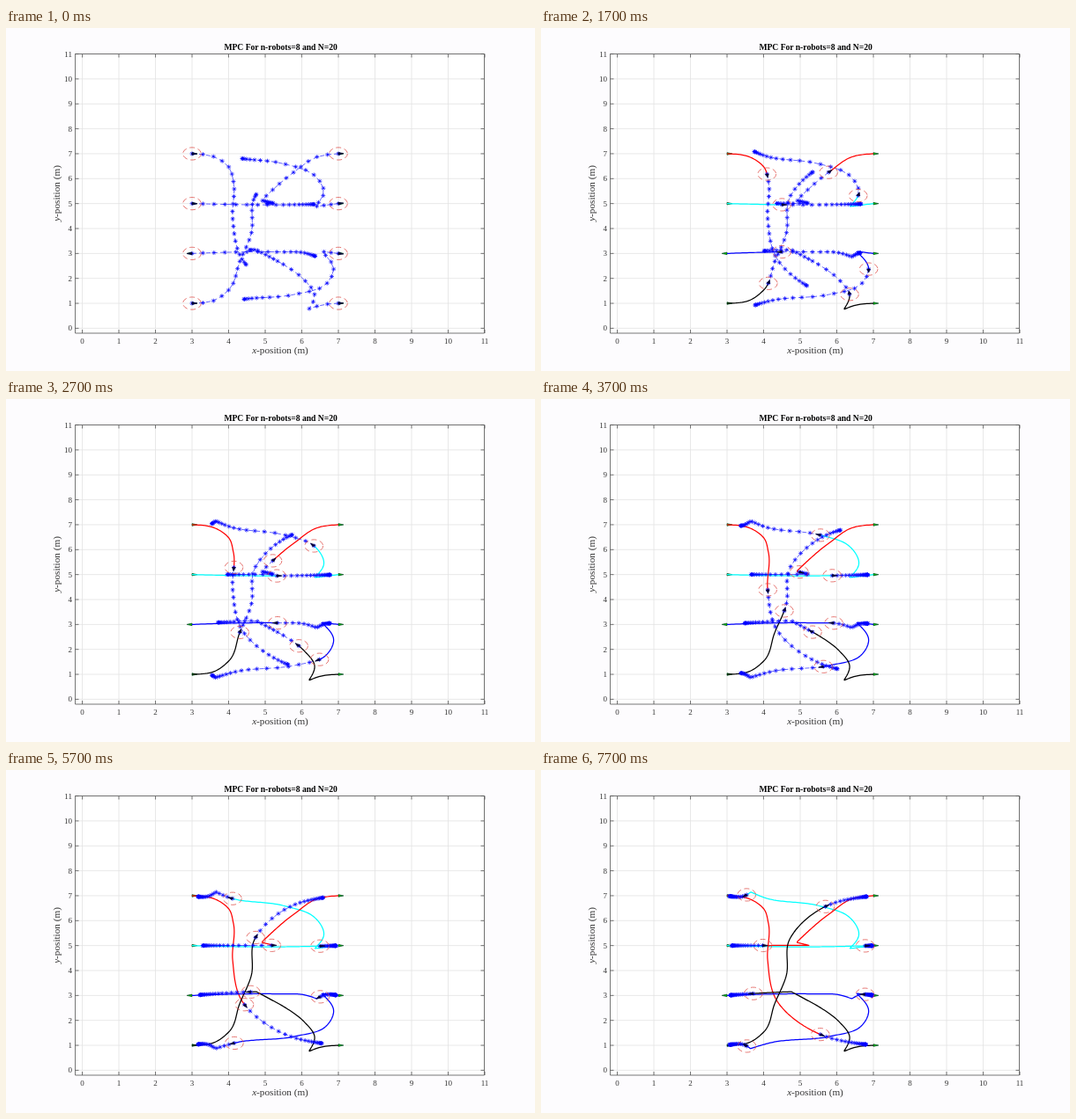
An HTML page that plays this animation: 600 by 390 pixels, repeating every 8000 ms.

```html
<!DOCTYPE html>
<html lang="en">
<head>
<meta charset="utf-8">
<title>MPC robots</title>
<style>
html, body { margin: 0; width: 100%; height: 100%; overflow: hidden; background: #fdfcfe; }
svg { display: block; width: 600px; height: 390px; }
text { font: 9px "Liberation Serif", "Noto Serif", serif; fill: #333; }
.title { font-weight: bold; font-size: 9.6px; fill: #000; }
.label { font-size: 11.2px; }
.label tspan { font-style: italic; }
.grid { stroke: #e2e2e2; stroke-width: .8; }
.axis { stroke: #555; stroke-width: .8; fill: none; }
.trail { fill: none; stroke-width: 1.25; stroke-linejoin: round; }
.plan { fill: none; stroke: #00f; stroke-width: .6; stroke-dasharray: 5 3; }
.stars { fill: none; stroke: #00f; stroke-width: .7; }
.ring { fill: none; stroke: #de4a44; stroke-width: .75; stroke-dasharray: 6 3.6; }
.body { fill: #003; stroke: #003; stroke-width: .7; }
.pose { fill: #0c0; stroke: #042; stroke-width: .7; }
</style>
</head>
<body>
<svg id="stage" viewBox="0 0 600 390"></svg>
<script>
const NS = 'http://www.w3.org/2000/svg';
const stage = document.getElementById('stage');
const UX = 41.5, UY = 28.35, X0 = 86.5, Y0 = 341.4;
const LEFT = 78.5, RIGHT = 542.5, TOP = 29.5, BOTTOM = 347;
const STEPS = 24, LOOP = 8000, HORIZON = 20;
// Metres per step, share of the remaining way covered per step, substeps
const CRUISE = .3, RATE = .132, SUB = 5;

function add(tag, attrs, text) {
  const el = document.createElementNS(NS, tag);
  for (const k in attrs) el.setAttribute(k, attrs[k]);
  if (text !== undefined) el.textContent = text;
  stage.append(el);
  return el;
}
const path = (cls, d = '', more = {}) => add('path', { class: cls, d, ...more });
const fix = v => v.toFixed(2);
const px = x => X0 + x * UX, py = y => Y0 - y * UY;
const poly = pts => 'M' + pts.map(([x, y]) => fix(px(x)) + ' ' + fix(py(y))).join('L');

// Plot frame
add('rect', { x: LEFT, y: TOP, width: RIGHT - LEFT, height: BOTTOM - TOP, fill: '#fff' });
for (let i = 0; i <= 11; i++) {
  const x = px(i), y = py(i);
  path('grid', `M${x} ${TOP}V${BOTTOM}M${LEFT} ${y}H${RIGHT}`);
  path('axis', `M${x} ${BOTTOM}v-4M${x} ${TOP}v4M${LEFT} ${y}h4M${RIGHT} ${y}h-4`);
  add('text', { x, y: 359, 'text-anchor': 'middle' }, i);
  add('text', { x: 75, y: y + 3, 'text-anchor': 'end' }, i);
}
path('axis', `M${LEFT} ${TOP}H${RIGHT}V${BOTTOM}H${LEFT}Z`);
add('text', { class: 'title', x: 311.6, y: 25, 'text-anchor': 'middle' }, 'MPC For n-robots=8 and N=20');
function label(name, attrs) {
  add('text', { class: 'label', 'text-anchor': 'middle', ...attrs }).innerHTML =
    `<tspan>${name}</tspan>-position (m)`;
}
label('x', { x: 311, y: 370 });
label('y', { transform: 'translate(61 188) rotate(-90)' });

// Small pointed marker at (x, y) with unit heading (c, s)
function arrow([x, y], [c, s]) {
  const h = .14, w = .045;
  return poly([[x + h * c, y + h * s], [x - w * s, y + w * c], [x + w * s, y - w * c]]) + 'Z';
}
const facing = (x, y) => x === 3 && y === 3 ? -1 : 1;
for (const y of [7, 5, 3, 1]) for (const x of [3, 7]) path('pose', arrow([x, y], [facing(x, y), 0]));

const unit = (a, b) => {
  const x = b[0] - a[0], y = b[1] - a[1], n = Math.hypot(x, y) || 1;
  return [x / n, y / n];
};
const gap = (a, b) => Math.hypot(b[0] - a[0], b[1] - a[1]);
const dot = (a, b) => a[0] * b[0] + a[1] * b[1];

// Smooth curve through the points, sampled
function smooth(pts) {
  const last = pts.length - 1;
  const h = pts.slice(1).map((p, i) => gap(pts[i], p));
  const d = h.map((len, i) => unit(pts[i], pts[i + 1]));
  const m = pts.map((_, i) => i && i < last
    ? [0, 1].map(c => (d[i - 1][c] * h[i] + d[i][c] * h[i - 1]) / (h[i - 1] + h[i])) : null);
  m[0] = last > 1 ? [0, 1].map(c => 1.5 * d[0][c] - .5 * m[1][c]) : d[0];
  m[last] = last > 1 ? [0, 1].map(c => 1.5 * d[last - 1][c] - .5 * m[last - 1][c]) : d[0];
  const out = [pts[0]];
  for (let i = 0; i < last; i++) {
    for (let n = 1; n <= 16; n++) {
      const u = n / 16, r = 1 - u;
      out.push([0, 1].map(c => pts[i][c] * r * r * (1 + 2 * u) + pts[i + 1][c] * u * u * (3 - 2 * u)
        + h[i] * u * r * (m[i][c] * r - m[i + 1][c] * u)));
    }
  }
  return out;
}

const robots = [];
// Each leg is a top speed and the points it passes; gear flips at sharp turns
function robot(color, start, ...legs) {
  const nodes = [];
  let from = start, len = 0, gear = 0, dir = [facing(...start), 0];
  for (const [speed, ...via] of legs) {
    const pts = smooth([from, ...via]);
    const out = unit(pts[0], pts[1]);
    gear = gear ? gear * (dot(dir, out) < 0 ? -1 : 1) : Math.sign(dot(dir, out));
    for (let i = 1; i < pts.length; i++) {
      dir = unit(pts[i - 1], pts[i]);
      nodes.push({ at: pts[i - 1], dir, s: len, speed, head: [dir[0] * gear, dir[1] * gear] });
      len += gap(pts[i - 1], pts[i]);
    }
    from = via[via.length - 1];
  }
  const find = s => nodes.findLast(n => n.s <= s);
  const at = s => {
    const { at: p, dir: d, s: s0 } = find(s);
    return [p[0] + d[0] * (s - s0), p[1] + d[1] * (s - s0)];
  };
  const advance = (s, fade) => s + Math.min(find(s).speed, RATE * fade * (len - s)) / SUB;
  const way = [0];
  for (let i = 0; i < STEPS * SUB; i++) way.push(advance(way[i], 1));
  robots.push({ color, at, advance, way, head: s => find(s).head });
}

robot('#0ff', [3, 5], [CRUISE, [5.4, 4.95], [7, 5]]);
robot('#0ff', [7, 5], [.2, [6.35, 4.88]],
  [CRUISE, [6.6, 5.4], [6.3, 6.19], [5.5, 6.6], [4.01, 6.93], [3.65, 7.15]],
  [CRUISE, [3.45, 6.98], [3, 7]]);
robot('#f00', [3, 7],
  [CRUISE, [3.58, 6.89], [4, 6.48], [4.13, 5.9], [4.11, 4.42], [4.42, 2.66], [5.63, 1.39], [7, 1]]);
robot('#f00', [7, 7], [CRUISE, [6.45, 6.89], [5.82, 6.3], [4.9, 5.13]],
  [.05, [5.24, 5.01]], [CRUISE, [3, 5]]);
robot('#00f', [3, 3], [CRUISE, [5.4, 3.06], [6.05, 3.03], [6.41, 2.87]],
  [CRUISE, [6.65, 3.03], [7, 3]]);
robot('#00f', [7, 3], [.2, [6.54, 3.08]],
  [CRUISE, [6.87, 2.4], [6.61, 1.7], [5.82, 1.36], [4.18, 1.1], [3.64, .87]],
  [CRUISE, [3.45, 1.03], [3, 1]]);
robot('#000', [3, 1],
  [CRUISE, [3.58, 1.1], [4, 1.53], [4.3, 2.66], [4.62, 3.8], [4.71, 5.25], [5.8, 6.64], [7, 7]]);
robot('#000', [7, 1], [CRUISE, [6.45, .9], [6.19, .75]],
  [CRUISE, [6.35, 1.35], [6.06, 1.95], [5.43, 2.62]],
  [.14, [4.76, 3.15]], [CRUISE, [4.23, 3.12], [3, 3]]);

const layer = (key, make) => robots.forEach(r => { r[key] = make(r); });
layer('trail', r => path('trail', '', { stroke: r.color }));
layer('plan', () => path('plan'));
layer('stars', () => path('stars'));
layer('body', () => path('body'));
layer('ring', () => add('ellipse', { class: 'ring', rx: UX / 4, ry: UY / 4 }));

function star(p) {
  const x = px(p[0]), y = py(p[1]);
  return `M${fix(x - 2.5)} ${fix(y)}h5M${fix(x)} ${fix(y - 2.5)}v5` +
    `M${fix(x - 1.75)} ${fix(y - 1.75)}l3.5 3.5m0 -3.5l-3.5 3.5`;
}

// Planned motion fades out towards the end of the horizon
function forecast(r, s) {
  const pts = [r.at(s)];
  for (let i = 1; i <= HORIZON * SUB; i++) {
    s = r.advance(s, 1 - (i / SUB / HORIZON) ** 3);
    if (i % SUB === 0) pts.push(r.at(s));
  }
  return pts;
}

function draw(k) {
  for (const r of robots) {
    const s = r.way[k * SUB], here = r.at(s), ahead = forecast(r, s);
    r.trail.setAttribute('d', k ? poly(r.way.slice(0, k * SUB + 1).map(r.at)) : '');
    r.plan.setAttribute('d', poly(ahead));
    r.stars.setAttribute('d', ahead.map(star).join(''));
    r.body.setAttribute('d', arrow(here, r.head(s)));
    r.ring.setAttribute('cx', fix(px(here[0])));
    r.ring.setAttribute('cy', fix(py(here[1])));
  }
}

const startOf = k => Math.round(k * 10 / 3) * 100;
let shown = -1;
function tick() {
  const t = performance.now() % LOOP;
  let k = STEPS - 1;
  while (k > 0 && startOf(k) > t) k--;
  if (k !== shown) draw(shown = k);
  requestAnimationFrame(tick);
}
tick();
</script>
</body>
</html>
```
